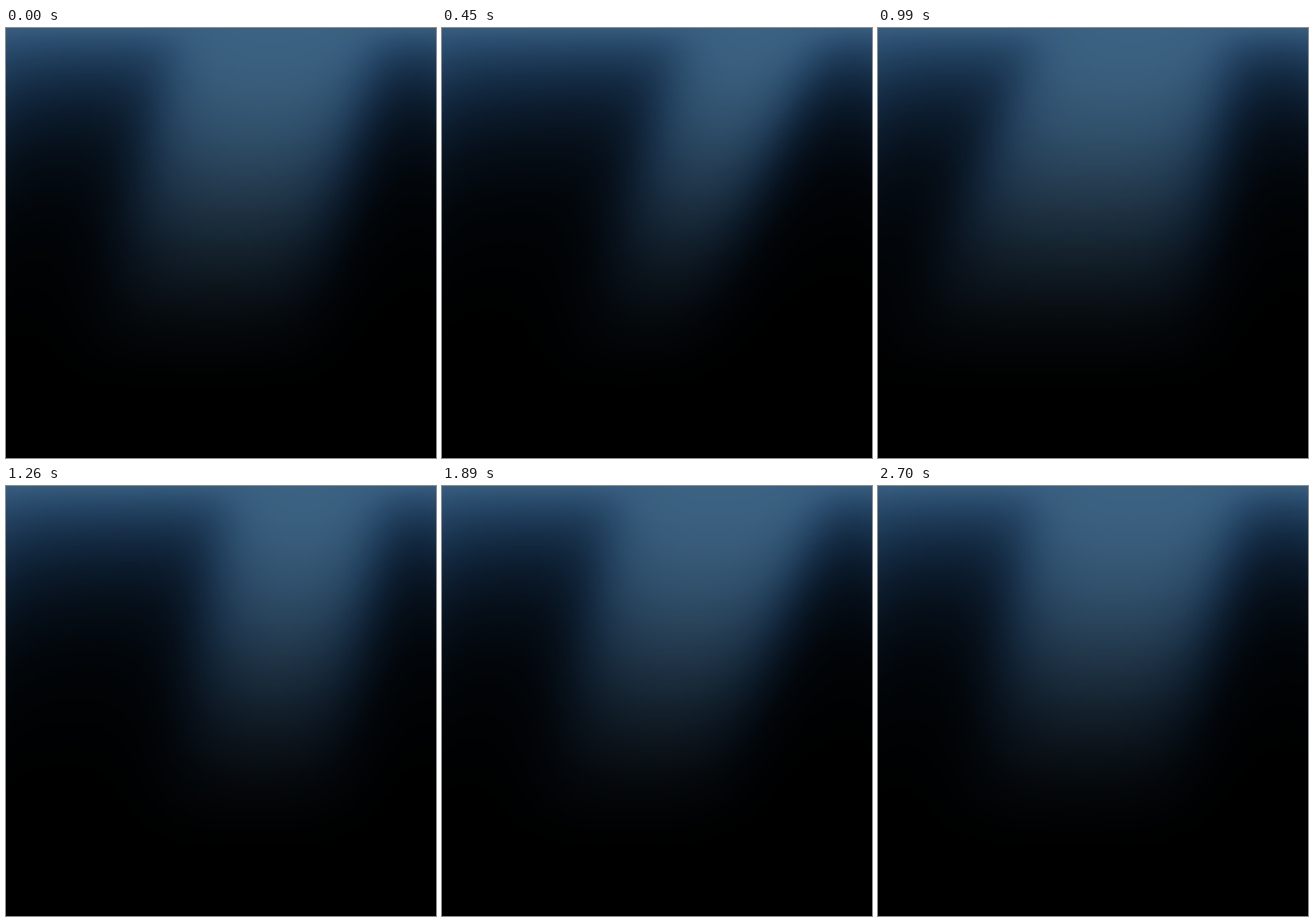
Recreate the animation shown at these times as an HTML page with a canvas. Size 748x748 px, loop 2790 ms.

```html
<!DOCTYPE html>
<html lang="en">
<head>
<meta charset="utf-8">
<title>Deep light</title>
<style>
  html, body { margin: 0; width: 100%; height: 100%; overflow: hidden; background: #000; }
  canvas { display: block; width: 748px; height: 748px; }
</style>
</head>
<body>
<canvas id="stage" width="187" height="187"></canvas>
<script>
const LOOP = 2790, STEP = 90, STAGE = 748, CELL = 4, SIZE = STAGE / CELL;
const FLOOR = 655;   // depth where the light ends
const REACH = 400;   // depth at which the low wall positions apply

const ctx = document.getElementById('stage').getContext('2d');
const image = ctx.createImageData(SIZE, SIZE);

// Walls of the light shaft: x at the surface and x at REACH
const poses = [
  { at: 0,    left: [300, 150], right: [645, 620] },
  { at: 450,  left: [425, 245], right: [660, 565] },
  { at: 810,  left: [230, -40], right: [585, 610] },
  { at: 1260, left: [390, 265], right: [655, 660] },
  { at: 1620, left: [200, 60],  right: [760, 600] },
  { at: 2160, left: [425, 280], right: [575, 590] },
  { at: 2700, left: [275, 150], right: [630, 610] }
];

const mix = (a, b, k) => a + (b - a) * k;
const mixPair = (p, q, k) => p.map((v, i) => mix(v, q[i], k));
const sigmoid = v => 1 / (1 + Math.exp(-v));

function wallsAt(t) {
  const i = poses.findLastIndex(p => p.at <= t);
  const a = poses[i], b = poses[(i + 1) % poses.length];
  const progress = (t - a.at) / ((b.at || LOOP) - a.at);
  const k = (1 - Math.cos(Math.PI * progress)) / 2;
  return { left: mixPair(a.left, b.left, k), right: mixPair(a.right, b.right, k) };
}

function draw({ left, right }) {
  let p = 0;
  for (let row = 0; row < SIZE; row++) {
    const y = (row + 0.5) * CELL, depth = y / REACH;
    const open = y < FLOOR ? 49 * (1 + Math.cos(Math.PI * y / FLOOR)) : 0;
    const l = mix(...left, depth), r = mix(...right, depth);
    const soft = mix(25, 45, Math.min(1, depth));
    for (let col = 0; col < SIZE; col++) {
      const x = (col + 0.5) * CELL;
      const shaft = sigmoid((x - l) / soft) * sigmoid((r - x) / soft);
      const rim = 1 - 0.25 * Math.abs(2 * x / STAGE - 1) ** 8;
      const murk = (0.06 + y / mix(140, 95, x / STAGE)) * rim;
      const clear = Math.exp(-murk * (1 - shaft));
      const green = open * clear;
      image.data[p++] = green * mix(0.28, 0.61, clear ** 0.7);
      image.data[p++] = green;
      image.data[p++] = green * mix(1.75, 1.33, clear);
      image.data[p++] = 255;
    }
  }
  ctx.putImageData(image, 0, 0);
}

let shown = -1;
function tick() {
  const t = Math.floor(performance.now() % LOOP / STEP) * STEP;
  if (t !== shown) {
    shown = t;
    draw(wallsAt(t));
  }
  requestAnimationFrame(tick);
}
tick();
</script>
</body>
</html>
```
